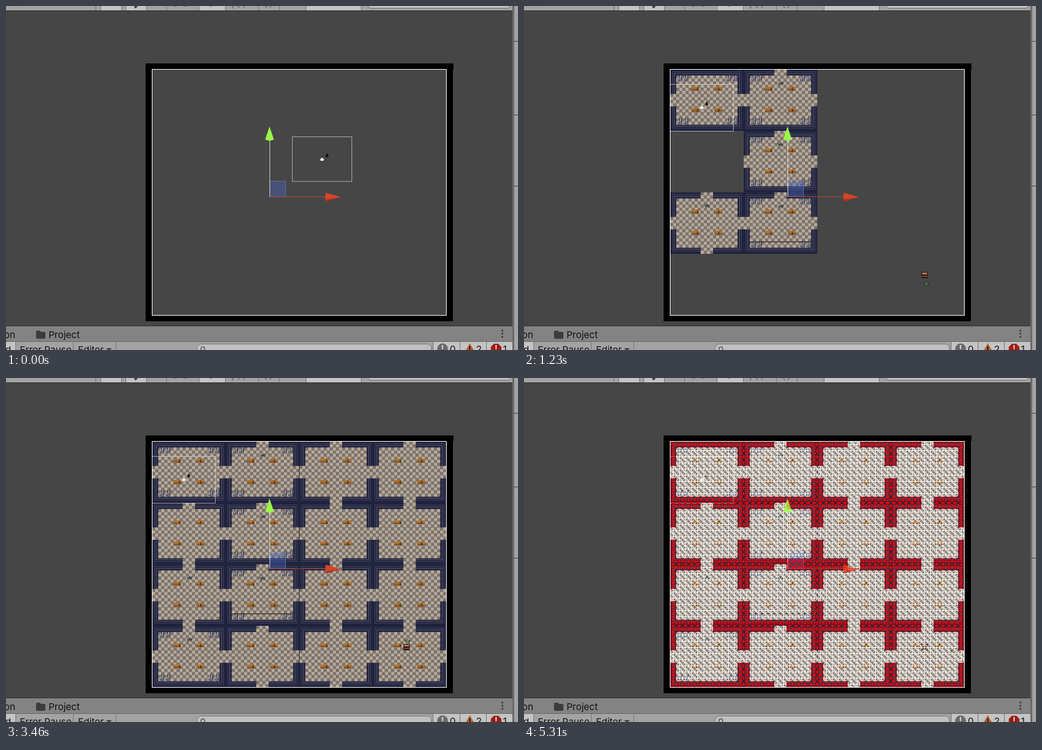
An HTML page with a canvas for the animation above (5.39 s loop, 818 by 551 pixels).

```html
<!DOCTYPE html>
<html lang="en">
<head>
<meta charset="utf-8">
<title>Level generation</title>
<style>
html, body { margin: 0; width: 818px; height: 551px; overflow: hidden; background: #464646; }
canvas, svg { position: absolute; left: 0; top: 0; display: block; }
text { font: 15px Inter, "Liberation Sans", sans-serif; fill: #111; }
.line { fill: #696969; }
.lit { fill: #c4c4c4; }
.bar { fill: #a3a3a3; }
.mark { font-weight: 700; font-size: 13px; fill: #ddd; text-anchor: middle; }
</style>
</head>
<body>
<canvas id="scene" width="818" height="551"></canvas>
<svg width="818" height="551" viewBox="0 0 818 551">
  <!-- top toolbar -->
  <rect class="bar" width="809" height="7"/>
  <g class="lit">
    <rect x="152" width="32" height="7"/><rect x="192" width="32" height="7"/>
    <rect x="308" width="43" height="7"/><rect x="480" width="87" height="7"/>
  </g>
  <path d="M143.5 0v7M151.5 0v7M184.5 0v7M191.5 0v7M224.5 0v7M256.5 0v7M308.5 0v7M350.5 0v7M403.5 0v7M436.5 0v7M479.5 0v7M567.5 0v7" stroke="#777"/>
  <rect x="578" y="-12" width="228" height="15.5" rx="5" fill="#c2c2c2" stroke="#707070"/>
  <text x="1" y="0">Shaded</text>
  <text x="488" y="0">Gizmos</text>
  <path d="M205 0h5l-2 3h-2zM268 0h5M284 0h5M325 0h5M362 0v4M372 0v3M380 0v3M414 0l3 3M424 0l-3 3" stroke="#444" fill="#444"/>
  <rect y="7" width="809" height="1" fill="#333"/>
  <!-- right panel -->
  <rect x="809" width="3" height="551" fill="#6a6a6a"/>
  <rect x="812" width="6" height="551" class="bar"/>
  <path d="M811 56.5h7M811 174.5h7M811 288.5h7" stroke="#444"/>
  <!-- lower tabs -->
  <rect y="512" width="809" height="1" fill="#333"/>
  <rect y="513" width="809" height="24" fill="#838383"/>
  <text x="-3" y="532">on</text>
  <path d="M48 522q0-2 2-2h4l2 2h5q2 0 2 2v7q0 2-2 2h-11q-2 0-2-2z" fill="#3c3c3c"/>
  <text x="68" y="532">Project</text>
  <g fill="#333"><circle cx="793" cy="520" r="1.4"/><circle cx="793" cy="525" r="1.4"/><circle cx="793" cy="530" r="1.4"/></g>
  <rect class="line" y="537" width="809" height="1"/>
  <rect class="bar" y="538" width="809" height="13"/>
  <rect class="lit" y="538" width="15" height="13"/>
  <path d="M15.5 538v13M107.5 538v13M175.5 538v13" stroke="#777"/>
  <text x="-1" y="556">d</text>
  <text x="22" y="556">Error Pause</text>
  <text x="115" y="556">Editor</text>
  <path d="M160 548h9l-4.5 5z" fill="#444"/>
  <rect x="305.5" y="541.5" width="374" height="18" rx="6" fill="#c0c0c0" stroke="#777"/>
  <circle cx="314.5" cy="549" r="3" fill="none" stroke="#555" stroke-width="1.3"/>
  <rect class="lit" x="683" y="538" width="126" height="13"/>
  <path d="M682.5 538v13M725.5 538v13M767.5 538v13" stroke="#777"/>
  <circle cx="697.5" cy="549" r="8.5" fill="#6a6a6a"/>
  <path d="M741 540l9 16h-18z" fill="#b4622c"/>
  <path d="M779.5 541h7l5 5v7l-5 5h-7l-5-5v-7z" fill="#a01d12"/>
  <text class="mark" x="697.5" y="553">!</text>
  <text class="mark" x="741" y="555" style="fill:#311">!</text>
  <text class="mark" x="783" y="553">!</text>
  <text x="709" y="555">0</text><text x="751" y="555">2</text><text x="794" y="555">1</text>
</svg>
<script>
const LOOP = 5390, START = 80, FILL = 1980, GRID = 3540;
const X0 = 233.5, Y0 = 101.5, TW = 9.79, TH = 9.85, COLS = 12, ROWS = 10;
const RW = TW * COLS, RH = TH * ROWS;

// column, row, time of appearance
const path = [[0, 0, 80], [1, 0, 240], [1, 1, 490], [1, 2, 740], [0, 2, 990], [0, 3, 1480]];
const noTop = ['00'];
const noBottom = ['00', '10', '11', '12', '03'];
const spiked = ['00', '10', '11', '12', '03'];
// time, x, y of the wandering creature
const walk = [[0, 668, 471], [2390, 618, 420], [2600, 617, 419], [2770, 622, 420],
  [3460, 641, 421], [4390, 670, 420], [5000, 681, 430], [5390, 686, 439]];
// x, y, time of appearance
const guards = [[409, 124, 240], [409, 222, 490], [409, 321, 740], [292, 320, 990], [292, 419, 1480]];

const ctx = document.getElementById('scene').getContext('2d');

function rect(c, color, x, y, w, h) {
  c.fillStyle = color;
  c.fillRect(x, y, w, h);
}

function box(c, color, x, y, w, h) {
  c.strokeStyle = color;
  c.lineWidth = 1;
  c.strokeRect(x, y, w, h);
}

function shape(c, color, ...pts) {
  c.fillStyle = color;
  c.beginPath();
  pts.forEach(p => c.lineTo(...p));
  c.fill();
}

function layer(paint) {
  const canvas = document.createElement('canvas');
  canvas.width = 818;
  canvas.height = 551;
  paint(canvas.getContext('2d'));
  return canvas;
}

function isFloor(key, i, j) {
  const sideDoor = j === 4 || j === 5, midDoor = i === 5 || i === 6;
  if (i === 0 || i === COLS - 1) return sideDoor;
  if (j === 0) return midDoor && !noTop.includes(key);
  if (j === ROWS - 1) return midDoor && !noBottom.includes(key);
  return true;
}

function eachTile(col, row, fn) {
  for (let j = 0; j < ROWS; j++)
    for (let i = 0; i < COLS; i++)
      fn(X0 + col * RW + i * TW, Y0 + row * RH + j * TH, isFloor('' + col + row, i, j));
}

function spikes(c, x, y) {
  for (const [color, d, width] of [['#3b3c4e', 1, 2], ['#c4c2c4', 0, 0.8]]) {
    c.strokeStyle = color;
    c.lineWidth = width;
    c.beginPath();
    c.moveTo(x + d + 1, y + 8.5);
    c.lineTo(x + d + 4, y + 2);
    c.lineTo(x + d + 4, y + 7);
    c.lineTo(x + d + 7.5, y + 1.5);
    c.lineTo(x + d + 7, y + 8);
    c.stroke();
  }
}

function crate(c, x, y, right) {
  rect(c, '#7a4a20', x - 6, y - 3, 12, 6);
  rect(c, '#b5762f', x - 6, y - 3, 12, 3);
  rect(c, '#95602c', x - 5, y, 10, 2);
  rect(c, '#4a2a14', x + (right ? 0 : 3), y - 2, 1.5, 5);
}

function room(c, col, row) {
  const x = X0 + col * RW, y = Y0 + row * RH, key = '' + col + row;
  rect(c, '#20223f', x, y, RW, RH);
  box(c, '#44465a', x + 3.5, y + 3.5, RW - 7, RH - 8);
  box(c, '#5b5d6c', x + 6.5, y + 6.5, RW - 13, RH - 14);
  eachTile(col, row, (tx, ty, floor) => {
    if (!floor) return;
    rect(c, '#7a7370', tx, ty, TW, TH);
    rect(c, '#b9aa96', tx + TW / 2, ty, TW / 2, TH / 2);
    rect(c, '#b9aa96', tx, ty + TH / 2, TW / 2, TH / 2);
  });
  for (const cy of [31, 65]) {
    crate(c, x + 40, y + cy, false);
    crate(c, x + 77, y + cy, true);
  }
  if (spiked.includes(key))
    for (const i of [1, 2, 9, 10])
      for (const j of [1, 8]) spikes(c, x + i * TW, y + j * TH);
  if (key === '12') rect(c, '#3a3030', x + TW, y + 78.5, RW - 2 * TW, 1.3);
}

function allRooms(fn) {
  for (let row = 0; row < 4; row++)
    for (let col = 0; col < 4; col++) fn(col, row);
}

const fullMap = layer(c => {
  allRooms((col, row) => room(c, col, row));
  rect(c, '#2b2a38', 468, Y0, 1, RH * 4);
});

// wire sphere on every tile: white where walkable, red on walls
const nodes = layer(c => {
  allRooms((col, row) => eachTile(col, row, (x, y, floor) => {
    const cx = x + TW / 2, cy = y + TH / 2, r = 4.6;
    c.strokeStyle = floor ? '#fff' : '#f00';
    c.lineWidth = floor ? 1 : 1.15;
    c.beginPath();
    c.arc(cx, cy, r, 0, Math.PI * 2);
    c.moveTo(cx - r, cy);
    c.lineTo(cx + r, cy);
    c.moveTo(cx, cy - r);
    c.lineTo(cx, cy + r);
    c.stroke();
  }));
});

const backdrop = layer(c => {
  rect(c, '#464646', 0, 0, 818, 551);
  rect(c, '#000', 223, 92, 491, 413);
  rect(c, '#000', 714, 92, 1, 10);
  rect(c, '#464646', 233, 101, 471, 395);
});

function creature(x, y, color, flip) {
  ctx.save();
  ctx.translate(x, y);
  if (flip) ctx.scale(-1, 1);
  ctx.strokeStyle = color;
  ctx.lineWidth = 1.3;
  ctx.beginPath();
  ctx.moveTo(-4, -2);
  ctx.lineTo(-1, 1);
  ctx.lineTo(-2, 3);
  ctx.moveTo(-1, 1);
  ctx.lineTo(1, -3);
  ctx.moveTo(0, 0);
  ctx.lineTo(4, 0);
  ctx.lineTo(3, 3);
  ctx.stroke();
  ctx.restore();
}

function walker(t) {
  const n = walk.findIndex(k => k[0] > t);
  const [a, ax, ay] = walk[n - 1], [b, bx, by] = walk[n];
  const p = (t - a) / (b - a), x = ax + (bx - ax) * p, y = ay + (by - ay) * p;
  creature(x, y, '#2c3a20', t % 320 < 160);
  rect(ctx, '#6da336', x - 1, y - 1, 3, 2);
}

function chest() {
  rect(ctx, '#2a1614', 635, 426, 10, 10);
  rect(ctx, '#b07850', 636, 427, 8, 3);
  rect(ctx, '#7c4a36', 636, 432, 8, 2);
}

function player(x, y) {
  ctx.fillStyle = '#f4f4f4';
  ctx.beginPath();
  ctx.ellipse(x, y, 3, 2, 0, 0, Math.PI * 2);
  ctx.fill();
  rect(ctx, '#f4f4f4', x - 1, y - 3, 2, 2);
  rect(ctx, '#111', x + 6, y - 8, 4, 4);
  rect(ctx, '#222', x + 7, y - 10, 1.5, 2);
}

function cones() {
  shape(ctx, '#9bf548', [421, 193], [428, 214], [421, 216], [414, 214]);
  shape(ctx, '#d4452a', [535, 306], [511, 299], [510, 306], [511, 313]);
  shape(ctx, '#a8301c', [535, 306], [511, 310], [511, 313]);
}

function moveTool() {
  rect(ctx, 'rgba(70,98,185,.42)', 421, 281, 26, 25);
  box(ctx, 'rgba(110,132,205,.6)', 421.5, 280.5, 25, 25);
  rect(ctx, 'rgba(222,232,210,.85)', 421, 214, 1, 92);
  rect(ctx, 'rgba(205,72,42,.8)', 421, 305, 91, 1);
  cones();
}

function draw(t) {
  ctx.drawImage(backdrop, 0, 0);
  if (t >= FILL) ctx.drawImage(fullMap, 0, 0);
  else path.forEach(([col, row, at]) => { if (t >= at) room(ctx, col, row); });

  if (t >= START) {
    guards.forEach(([x, y, at], i) => {
      const flip = Math.floor(t / 310 + i * 0.7) % 2;
      if (t >= at) creature(x + flip * 2, y, '#2d3d3c', flip);
    });
    chest();
    walker(t);
    player(284, 163);
    box(ctx, 'rgba(235,235,235,.6)', 233.5, 125.5, 101, 75);
  } else {
    player(505, 246);
    box(ctx, '#a8a8a8', 457.5, 209.5, 95, 71.5);
  }
  moveTool();
  if (t >= GRID) {
    ctx.drawImage(nodes, 0, 0);
    ctx.globalAlpha = 0.6;
    cones();
    ctx.globalAlpha = 1;
  }
  box(ctx, '#fff', 233.5, 101.5, 470, 394);
}

const begin = performance.now();
function tick() {
  draw((performance.now() - begin) % LOOP);
  requestAnimationFrame(tick);
}
tick();
</script>
</body>
</html>
```
